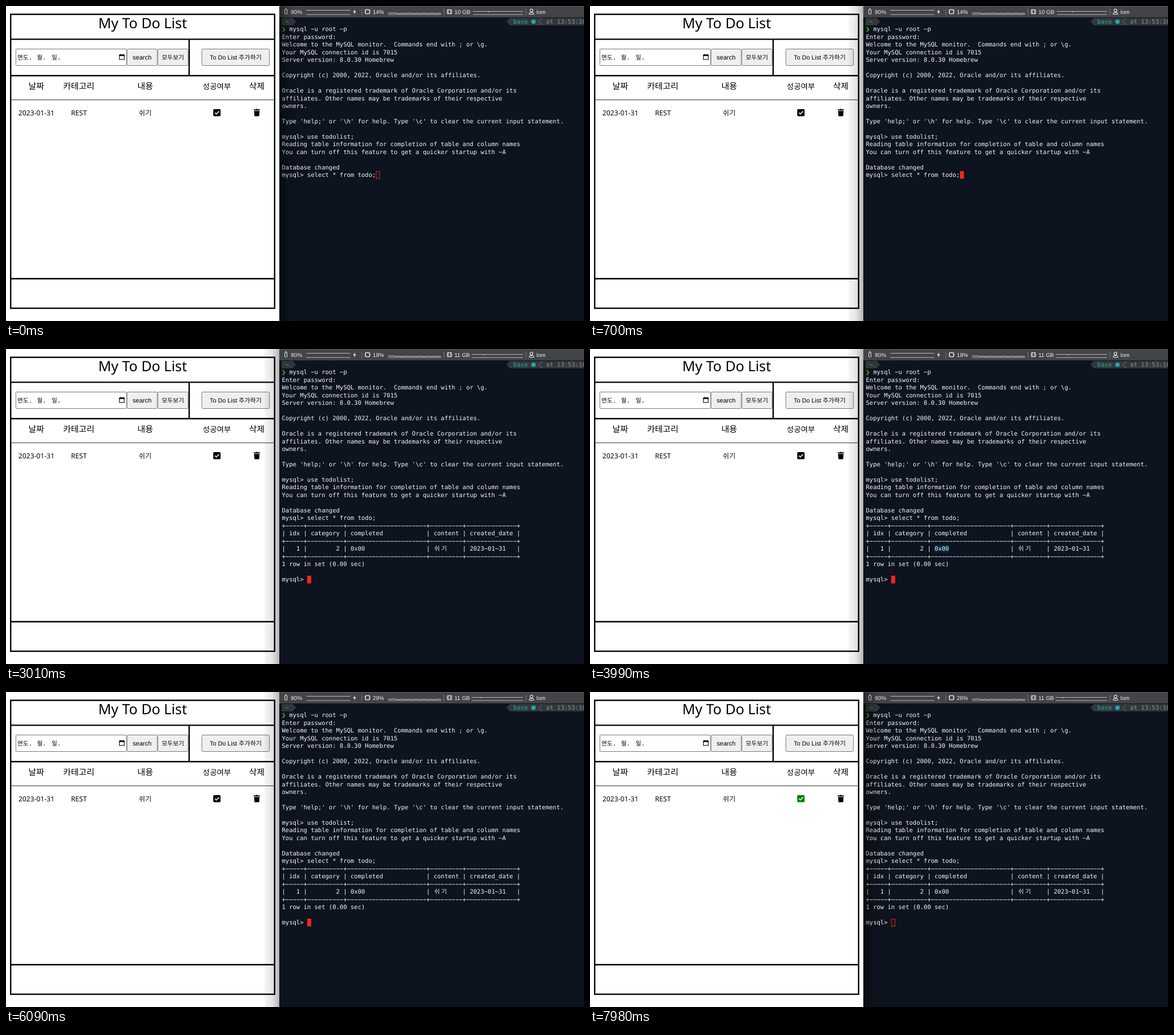
An HTML page with a canvas that plays this animation: 1013x553 px, repeating every 8000 ms.

```html
<!DOCTYPE html>
<html lang="ko">
<head>
<meta charset="utf-8">
<title>My To Do List</title>
<style>
html, body { margin: 0; width: 100%; height: 100%; overflow: hidden; background: #fff; }
canvas { display: block; }
</style>
</head>
<body>
<canvas id="stage" width="1013" height="553"></canvas>
<script>
const LOOP = 8000;
const FOCUS = 560, ENTER = 1540, BLUR = 6160, CHECKED = 6370;
const SELECT = 3500, DESELECT = 4830;
const LOAD_STEPS = [[0, 14], [980, 22], [1960, 31], [3010, 19], [4060, 24], [5080, 27], [6090, 29], [7140, 26]];

const ctx = document.getElementById('stage').getContext('2d');
ctx.textRendering = 'geometricPrecision';

const PAGE = '"Noto Sans", "Noto Sans CJK KR", sans-serif';
const HANGUL = '"Noto Sans CJK KR", sans-serif';
const UI = '"Liberation Sans", "Noto Sans CJK KR", sans-serif';
const MONO = '"DejaVu Sans Mono", "Noto Sans CJK KR", monospace';
const MONO_SIZE = 10.53, CELL = MONO_SIZE * 0.602, LINE = 13.465, LEFT = 483.5, FIRST = 44.35;

function text(str, x, y, size, font, color = '#000', align = 'left') {
  ctx.font = `${size}px ${font}`;
  ctx.fillStyle = color;
  ctx.textAlign = align;
  ctx.fillText(str, x, y);
}

// the terminal face has hyphens as wide as a minus sign
function mono(str, x, y, color = '#f7f7f5') {
  text(str.replaceAll('-', '\u2212'), x, y, MONO_SIZE, MONO, color);
}

function rect(x, y, w, h, color) {
  ctx.fillStyle = color;
  ctx.fillRect(x, y, w, h);
}

function box(x, y, w, h, radius, fill, stroke, width = 1) {
  ctx.beginPath();
  ctx.roundRect(x, y, w, h, radius);
  if (fill) { ctx.fillStyle = fill; ctx.fill(); }
  if (stroke) { ctx.strokeStyle = stroke; ctx.lineWidth = width; ctx.stroke(); }
}

function path(d, color, width) {
  const p = new Path2D(d);
  if (width) {
    ctx.strokeStyle = color;
    ctx.lineWidth = width;
    ctx.stroke(p);
  } else {
    ctx.fillStyle = color;
    ctx.fill(p);
  }
}

function shadow(x, w, ...alphas) {
  const shade = ctx.createLinearGradient(x, 0, x + w, 0);
  alphas.forEach((a, i) => shade.addColorStop(i / (alphas.length - 1), `rgba(0,0,0,${a})`));
  rect(x, 0, w, 553, shade);
}

function drawPage(done) {
  rect(0, 0, 480, 553, '#fff');
  ctx.strokeStyle = '#000';
  ctx.lineWidth = 2.4;
  ctx.strokeRect(8.2, 14.6, 462.6, 516);
  path('M8 58.4H471M8 122.2H471M8 478.8H471M321 58V122', '#000', 2.4);
  path('M9 164.6H470', '#555', 1.2);
  text('My To Do List', 239.5, 39, 24.9, PAGE, '#000', 'center');

  box(17.3, 75.5, 194, 29, 1, '#fff', '#777');
  text('연도.', 20, 93.6, 10.6, MONO);
  text('월.', 54.3, 93.6, 10.6, MONO);
  text('일.', 80, 93.6, 10.6, MONO);
  ctx.strokeStyle = '#000';
  ctx.lineWidth = 1.1;
  ctx.strokeRect(198.8, 86.3, 8.4, 7.6);
  rect(198.4, 85.4, 9.2, 2.4, '#000');
  path('M200.6 84V86M205.4 84V86', '#000', 1.2);

  const button = (x, w, label, size) => {
    box(x, 75.5, w, 29, 2, '#efefef', '#777');
    text(label, x + w / 2, 93.6, size, UI, '#000', 'center');
  };
  button(212, 53.2, 'search', 11);
  button(266, 53.2, '모두보기', 10.6);
  button(343.2, 118.5, 'To Do List 추가하기', 10.8);

  const headers = [['날짜', 53, 15], ['카테고리', 127.5, 15], ['내용', 244, 15], ['성공여부', 369.5, 13.4], ['삭제', 439.5, 15]];
  for (const [label, x, size] of headers) text(label, x, 145.6, size, HANGUL, '#000', 'center');
  text('2023-01-31', 53.3, 191.7, 12.1, PAGE, '#000', 'center');
  text('REST', 127.8, 191.7, 12.2, PAGE, '#000', 'center');
  text('쉬기', 244, 191.7, 12.1, HANGUL, '#000', 'center');

  box(363.2, 181, 12.8, 12.6, 1.8, done ? '#008000' : '#000');
  path('M366.2 187.3L368.6 189.7L373.2 184.9', '#fff', 1.6);
  path('M434 181.6H437.4L438 180.8H441.2L441.8 181.6H445.2V183.2H434ZM434.8 184.2H444.4L443.8 192.4Q443.7 193.6 442.5 193.6H436.7Q435.5 193.6 435.4 192.4Z', '#000');
}

function drawStatusBar(t) {
  const step = LOAD_STEPS.findLastIndex(([at]) => t >= at);
  const ink = '#f2f2f2', faint = '#b9b9bb';
  const busy = step > 0;
  rect(479, 0, 534, 20, '#434448');
  rect(479, 0, 534, 1, '#5a5b5e');
  const label = (str, x) => text(str, x, 14, 9.8, UI, ink);

  box(488.6, 6, 4, 8.2, 1, null, ink, 1);
  rect(489.6, 4.4, 2, 1.4, ink);
  label('80%', 499.6);
  path('M526.5 7.5H603.5M526.5 15H603.5', faint, 1);
  path('M612 5.5L608.3 11H610.8L609.6 15L613.6 9.4H611Z', ink);

  box(630, 6.4, 7.2, 7.2, 1, null, ink, 1.4);
  path('M628.6 8.5H630M628.6 11.5H630M637.2 8.5H638.6M637.2 11.5H638.6', ink, 0.8);
  label(LOAD_STEPS[step][1] + '%', 642.8);
  ctx.beginPath();
  for (let i = 0; i <= 38; i++) {
    const n = i + step;
    const y = 12.6 - 0.7 * Math.sin(n * 1.9) * Math.sin(n * 0.7) + (i > 5 ? 0.4 : -0.3);
    ctx.lineTo(670 + i * 2.43, y);
  }
  ctx.strokeStyle = '#dcdcdc';
  ctx.lineWidth = 1;
  ctx.stroke();
  path('M669.5 15H762.5', faint, 0.9);

  box(773.4, 6.4, 7.6, 7.2, 0.5, null, ink, 1);
  path('M775.2 6.5V13.5M779.2 6.5V13.5', ink, 1);
  label(busy ? '11 GB' : '10 GB', 786);
  const from = busy ? 816 : 818.5;
  path(`M${from} 9.5H906M${from} 15H906`, faint, 1);
  rect(845 - step * 2.4, 10, 1.6, 1, faint);

  ctx.beginPath();
  ctx.arc(921, 8, 2.5, 0, 7);
  ctx.strokeStyle = ink;
  ctx.lineWidth = 1.1;
  ctx.stroke();
  path('M917 14.5V13.6Q917 11.6 919 11.4H923Q925 11.6 925 13.6V14.5Z', ink, 1);
  label('lom', 929.8);
  path('M623.5 5V16M767.5 5V16M911.5 5V16', '#77787b', 1);
}

function drawPrompt() {
  path('M483 21H502.5L508.5 27.5L502.5 34H483Z', '#343739');
  mono('~', 489.5, 31.2, '#19b5c4');
  path('M883 21H1013V34H883L877 27.5Z', '#343739');
  mono('base', 889.2, 31.2, '#17adb5');
  ctx.beginPath();
  ctx.arc(924.5, 27.6, 3.9, 0, 7);
  ctx.fillStyle = '#17adb5';
  ctx.fill();
  path('M939.5 22L934 27.5L939.5 33', '#777b7c', 1);
  mono('at 13:53:10', 946.6, 31.2, '#819699');
  path('M485 37L488.4 41.3L485 45.6', '#4fc414', 1.6);
}

const RULE = '+' + [5, 10, 22, 9, 14].map(n => '-'.repeat(n)).join('+') + '+';
const INTRO = [
  '  mysql -u root -p',
  'Enter password:',
  'Welcome to the MySQL monitor.  Commands end with ; or \\g.',
  'Your MySQL connection id is 7015',
  'Server version: 8.0.30 Homebrew',
  '',
  'Copyright (c) 2000, 2022, Oracle and/or its affiliates.',
  '',
  'Oracle is a registered trademark of Oracle Corporation and/or its',
  'affiliates. Other names may be trademarks of their respective',
  'owners.',
  '',
  "Type 'help;' or '\\h' for help. Type '\\c' to clear the current input statement.",
  '',
  'mysql> use todolist;',
  'Reading table information for completion of table and column names',
  'You can turn off this feature to get a quicker startup with -A',
  '',
  'Database changed',
  'mysql> select * from todo;'
];
const row = (...cells) => '| ' + cells.join(' | ') + ' |';
const RESULT = [
  RULE,
  row('idx', 'category', 'completed'.padEnd(20), 'content', 'created_date'),
  RULE,
  row('  1', '       2', '0x00'.padEnd(20), ' '.repeat(7), '2023-01-31  '),
  RULE,
  '1 row in set (0.00 sec)',
  '',
  'mysql> '
];

function drawTerminal(t, focused) {
  rect(479, 0, 534, 553, '#0d131f');
  drawStatusBar(t);
  drawPrompt();

  const entered = t >= ENTER;
  const lines = entered ? INTRO.concat(RESULT) : INTRO;
  const column = n => LEFT + n * CELL;
  const baseline = n => FIRST + n * LINE;
  if (t >= SELECT && t < DESELECT) rect(column(19), baseline(23) - 10, CELL * 4, 13, '#002a3b');
  lines.forEach((line, i) => mono(line, LEFT, baseline(i)));
  if (entered) {
    text('쉬', column(42) + 0.7, baseline(23), 10.5, HANGUL, '#f7f7f5');
    text('기', column(44) + 0.7, baseline(23), 10.5, HANGUL, '#f7f7f5');
  }

  const last = lines.length - 1;
  const x = column(lines[last].length), y = Math.round(baseline(last)) - 10;
  if (focused) rect(x, y, 7, 13.4, '#f3281e');
  else box(x + 0.5, y + 0.5, 6, 12.4, 0, null, '#d3261f', 1.1);
}

function draw(now) {
  const t = now % LOOP;
  const focused = t >= FOCUS && t < BLUR;
  drawPage(t >= CHECKED);
  drawTerminal(t, focused);
  // the window in front casts its shadow on the other one
  if (focused) shadow(453, 26, 0.03, 0.1, 0.29);
  else shadow(479, 30, 0.4, 0.13, 0);
  requestAnimationFrame(draw);
}
requestAnimationFrame(draw);
</script>
</body>
</html>
```
